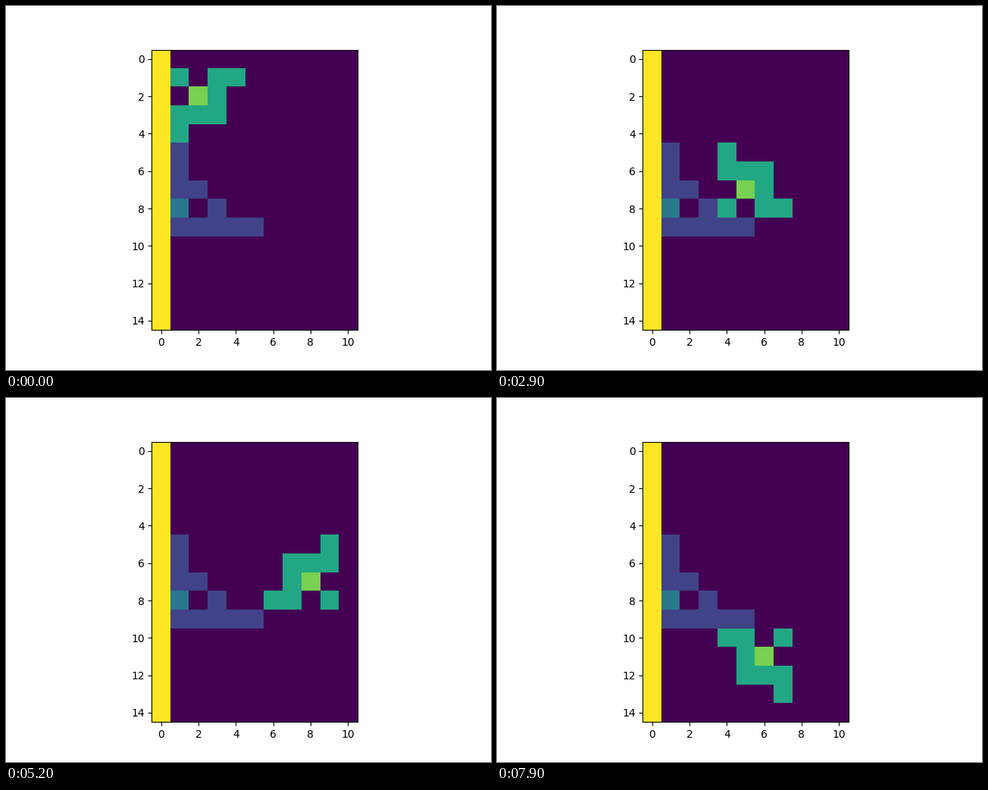
These frames come from a looping animation (640x480 px, 8 s). A matplotlib script:

```python
import numpy as np
import matplotlib.pyplot as plt
from matplotlib.animation import FuncAnimation

ROWS, COLS = 15, 11
FRAMES, INTERVAL = 80, 100
WALL = 5


def grid(*rows):
    return np.array([[int(ch) for ch in row] for row in rows])


# Fixed body with its core (2) and moving body with its core (4)
fixed = grid("10000", "10000", "11000", "20100", "11111")
mover = grid("3033", "0430", "3330", "3000")

board = np.zeros((ROWS, COLS), int)
board[:, 0] = WALL
board[5:10, 1:6] = fixed


def near(mask):
    """Grow a mask by one cell in all eight directions."""
    padded = np.pad(mask, 1)
    grown = np.zeros_like(mask)
    for dr in range(3):
        for dc in range(3):
            grown |= padded[dr:dr + ROWS, dc:dc + COLS]
    return grown


def contacts(piece):
    """Yield boards where the piece touches the fixed body without overlap."""
    h, w = piece.shape
    for r in range(ROWS - h + 1):
        for c in range(COLS - w + 1):
            layer = np.zeros_like(board)
            layer[r:r + h, c:c + w] = piece
            used = layer > 0
            if not (used & (board > 0)).any() and (used & halo).any():
                yield board + layer


halo = near((board > 0) & (board < WALL))
poses = [mover, mover[::-1], mover[::-1, ::-1], mover[:, ::-1]]
states = [state for pose in poses for state in contacts(pose)]

fig, ax = plt.subplots(figsize=(6.4, 4.8), dpi=100)
image = ax.imshow(states[0], cmap="viridis", vmin=0, vmax=WALL)


def update(i):
    image.set_data(states[i])
    return image,


anim = FuncAnimation(fig, update, frames=FRAMES, interval=INTERVAL,
                     repeat=True, repeat_delay=0)
plt.show()
```
